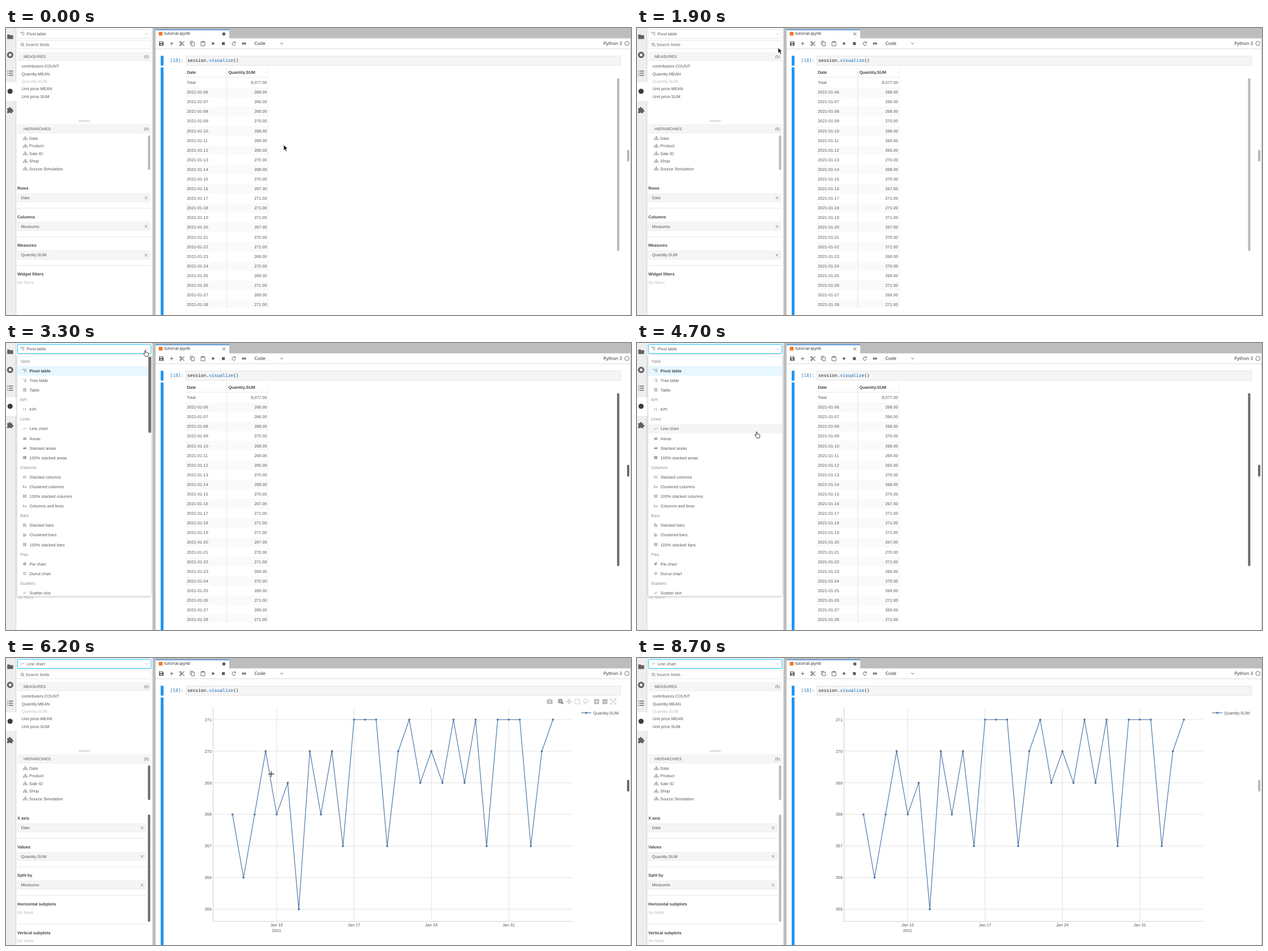
These frames come from a looping animation (1103 px wide and 508 px high, 8800 ms). An HTML page:

```html
<!DOCTYPE html>
<html lang="en">
<head>
<meta charset="utf-8">
<title>Notebook chart switch</title>
<style>
html, body { margin: 0; width: 100%; height: 100%; overflow: hidden; background: #fff; }
svg { display: block; width: 1103px; height: 508px; }
text { font: 7.32px "Liberation Sans", Arial, sans-serif; fill: #595959; text-rendering: geometricPrecision; white-space: pre; }
.b { font-weight: 700; fill: #434343; }
.off { fill: #bfbfbf; }
.head { fill: #8c8c8c; }
.cap { font-size: 7px; }
.num { font-size: 6.7px; }
.ui { font-family: "Open Sans", "Noto Sans", sans-serif; fill: #212121; }
.big { font-size: 7.93px; }
.code { font: 7.93px "DejaVu Sans Mono", monospace; fill: #212121; }
.tick { fill: #555; }
.bar { fill: #bababa; }
.dark .bar { fill: #6a6a6a; }
</style>
</head>
<body>
<svg id="stage" viewBox="0 0 1103 508"></svg>
<script>
const LOOP = 8800, ROW = 17.09, DAY = 19.5;
const values = [268, 266, 268, 270, 268, 269, 265, 270, 268, 270, 267, 271, 271, 271, 267,
  270, 271, 269, 270, 269, 271, 269, 271, 267, 271, 271, 271, 267, 270, 271];

// Drawing helpers; text is placed by its vertical middle
const text = (x, y, s, cls = '', more = '') => `<text x="${x}" y="${y + 2.6}" class="${cls}" ${more}>${s}</text>`;
const END = 'text-anchor="end"', MID = 'text-anchor="middle"';
const box = (x, y, w, h, fill, more = '') => `<rect x="${x}" y="${y}" width="${w}" height="${h}" fill="${fill}" ${more}/>`;
const frame = (x, y, w, h, fill, line, r = 1) => box(x, y, w, h, fill, `stroke="${line}" stroke-width=".7" rx="${r}"`);
const line = (d, color, w = 0.7, more = '') => `<path d="${d}" fill="none" stroke="${color}" stroke-width="${w}" ${more}/>`;
const shape = (d, fill, more = '') => `<path d="${d}" fill="${fill}" ${more}/>`;
const dot = (x, y, r, fill, more = '') => `<circle cx="${x}" cy="${y}" r="${r}" fill="${fill}" ${more}/>`;
const at = (x, y, s) => `<g transform="translate(${x} ${y})">${s}</g>`;
const group = (id, s, more = '') => `<g id="${id}" ${more}>${s}</g>`;
const each = (list, fn) => list.map(fn).join('');
const scroll = (x, y, h) => box(x, y, 4, h, '#bababa', 'class="bar" rx="2"');

// Small menu icons: grey part, blue part
const kinds = {
  pivot: ['M-1.2-3h4.5v1h-4.5zM-1.2-.8h4.5v1h-4.5zM-1.2 1.4h4.5v1h-4.5z', 'M-3.8-3h2v1.8h-2z'],
  tree: ['M-1.6-2.4h4.8v.9h-4.8zM-.5-.3h3.7v.9h-3.7zM-.5 1.7h3.7v.9h-3.7z', 'M-3.4-2.5h1.2v1h-1.2z'],
  table: ['M-3-.6h6v.9h-6zM-3 1.5h6v.9h-6zM-.4-.6h.8v3h-.8z', 'M-3-2.8h6v1.3h-6z'],
  kpi: ['M-2.8-1.2h2v1h-2zM.4-1.2h2v1h-2zM-2.8.8h1.6v.8h-1.6zM.4.8h2v.8h-2z', ''],
  line: ['M-3 1.4L-1-.6 .5.2 3-2v1L.6 1.1-.9.4-3 2.3z', ''],
  area: ['M-3 2.4V.6L-1-.4 1 .4 3-.4v2.8z', 'M-3 .2L-1-1.6 1-.6 3-2.4V-.8L1 0-1-.8-3 .3z'],
  area2: ['M-3 2.2V.3L-1-1.2 1-.5 3-2v4.2z', ''],
  area3: ['M-3 2.4V.4L-1-.5 1 .5 3-.5v2.9z', 'M-3-2.4h6V-.9L1 0-1-.9-3 0z'],
  col: ['M-3 .4h1.2v2H-3zM-.6-.2h1.2v2.6H-.6zM1.8.6H3v1.8H1.8z', 'M-3-1.2h1.2v1.4H-3zM-.6-2.2h1.2v1.8H-.6zM1.8-1H3V.4H1.8z'],
  col2: ['M-3-2h1.3v4.4H-3zM-.6 0h1.2v2.4H-.6zM1.8-1H3v3.4H1.8z', ''],
  col3: ['M-3 .2h1.4v2.4H-3zM-.7-.4h1.4v3H-.7zM1.6.4H3v2.2H1.6z', 'M-3-2.6h1.4V0H-3zM-.7-2.6h1.4v2H-.7zM1.6-2.6H3V.2H1.6z'],
  bar: ['M-.6-2.6h1.8v1.3H-.6zM.2-.6h2.4v1.3H.2zM-.2 1.4h3.4v1.3H-.2z', 'M-3-2.6h2.2v1.3H-3zM-3-.6H0v1.3h-3zM-3 1.4h2.6v1.3H-3z'],
  bar2: ['M-3-2.3h3.6v1.2H-3zM-3-.4h6v1.2h-6zM-3 1.5h5v1.2h-5z', ''],
  bar3: ['M-.8-2.6H3v1.3H-.8zM.2-.6H3v1.3H.2zM-.2 1.4H3v1.3H-.2z', 'M-3-2.6H-1v1.3h-2zM-3-.6H0v1.3h-3zM-3 1.4h2.6v1.3H-3z'],
  pie: ['M-.3-2.3A2.5 2.5 0 1 0 2.3.4H-.3z', 'M.2-2.8A2.6 2.6 0 0 1 2.8-.2H.2z'],
  donut: ['M0-2.5A2.5 2.5 0 1 0 2.5 0H1.4A1.4 1.4 0 1 1 0-1.4z', 'M.4-2.6A2.5 2.5 0 0 1 2.6-.4H1.5L.4-1.4z'],
  scatter: ['M-3 1.8L-1-.2 .4.9 3-2.2v1L.5 2-.9.9-2.6 2.5z', '']
};
const icon = (kind, x, y) => at(x, y, shape(kinds[kind][0], '#999') + shape(kinds[kind][1], '#7c9cbd'));

const items = [['Table'], ['Pivot table', 'pivot'], ['Tree table', 'tree'], ['Table', 'table'],
  ['KPI'], ['KPI', 'kpi'],
  ['Lines'], ['Line chart', 'line'], ['Areas', 'area'], ['Stacked areas', 'area2'], ['100% stacked areas', 'area3'],
  ['Columns'], ['Stacked columns', 'col'], ['Clustered columns', 'col2'], ['100% stacked columns', 'col3'], ['Columns and lines', 'col2'],
  ['Bars'], ['Stacked bars', 'bar'], ['Clustered bars', 'bar2'], ['100% stacked bars', 'bar3'],
  ['Pies'], ['Pie chart', 'pie'], ['Donut chart', 'donut'],
  ['Scatters'], ['Scatter plot', 'scatter']];
const rowTop = i => 23.7 + i * ROW;

function menu(id, sel) {
  const rows = each(items, ([name, kind], i) => {
    const y = rowTop(i) + ROW / 2;
    if (!kind) return text(25, y, name, 'head');
    const back = i === sel ? box(20, rowTop(i), 236, ROW, '#e6f7ff') : '';
    return back + icon(kind, 33, y - 0.4) + text(41.5, y, name, i === sel ? 'b' : '');
  });
  const hover = sel === 1 ? box(20, 0, 236, ROW, '#f5f5f5', 'id="hover"') : '';
  return group(id, box(20, 21.2, 236, 426.3, '#fff', 'rx="1.5" filter="url(#shadow)"') +
    `<g clip-path="url(#list)">${hover}${rows}</g>`);
}

function rail() {
  const c = '#616161';
  return box(0, 0, 18, 508, '#eee') + line('M17.6 0V508', '#c4c4c4') + box(0, 96, 18.2, 33, '#fff') +
    shape('M2.2 11.5h4l1.2 1.3h5.2v6.6H2.2z', c) +
    dot(7.3, 47.6, 5.6, c) + box(5.1, 45.4, 4.4, 4.4, '#eee') +
    each([76.3, 80, 83.7], y => box(2.2, y - 0.7, 1.5, 1.4, c) + box(4.9, y - 0.7, 7.4, 1.4, c)) +
    dot(7.2, 112, 4.6, '#3c3c3c') +
    at(7, 145, shape('M-5-3h2.9a1.7 1.7 0 1 1 3.2 0H4v3a1.7 1.7 0 1 1 0 3.2v2.6H1a1.7 1.7 0 0 0-3.2 0H-5V2.6a1.7 1.7 0 0 0 0-3z', c));
}

const section = (y, title, value, right, empty) => text(20, y, title, 'b') + (value
  ? frame(20, y + 9.9, right - 20, 14.6, '#f5f5f5', '#e8e8e8') + text(26.5, y + 17.1, value) +
    line(`M${right - 9.2} ${y + 14.7}l4.6 5m0-5l-4.6 5`, '#757575', 0.75)
  : text(20, y + 14.8, empty, 'off'));

const sections = (list, right, empty) => each(list, ([title, value], i) => {
  const y = 283.4 + i * 50.66;
  return section(y, title, value, right, empty) +
    (i < list.length - 1 ? line(`M20 ${y + 35.6}H${right + 2}`, '#dcdcdc') : '');
});

function fields() {
  const bar = (y, s) => box(20, y, 236, 15.6, '#f5f5f5') + line(`M20 ${y + 15.6}h236`, '#e6e6e6') +
    text(31, y + 8, s, 'cap') + text(252, y + 8, '(5)', 'num', END);
  const tree = line('M0-2.6V0M-3 2.4V0H3V2.4M0 0V2.4', '#777', 0.8) + box(-0.9, -3.3, 1.8, 1.4, '#777') +
    each([-3, 0, 3], x => box(x - 0.7, 1.8, 1.4, 1.4, '#777'));
  return frame(20.3, 22.2, 235.7, 14.6, '#fff', '#dedede') +
    dot(28.6, 29, 2.3, 'none', 'stroke="#555" stroke-width=".8"') + line('M30.3 30.8l2 2', '#555', 0.9) +
    text(34.5, 29.4, 'Search fields', '', 'style="fill:#6b6b6b"') + bar(42.4, 'MEASURES') +
    each(['contributors.COUNT', 'Quantity.MEAN', 'Quantity.SUM', 'Unit price.MEAN', 'Unit price.SUM'],
      (s, i) => text(27.5, 67.6 + i * 13.43, s, i === 2 ? 'off' : '')) +
    box(128, 163.4, 20, 2.4, '#d9d9d9') + bar(170.2, 'HIERARCHIES') +
    each(['Date', 'Product', 'Sale ID', 'Shop', 'Source Simulation'],
      (s, i) => at(34, 195.2 + i * 13.43, tree) + text(41, 195.2 + i * 13.43, s)) +
    scroll(250.5, 190, 61.5);
}

function notebook() {
  const c = '#616161';
  return box(258.5, 0, 5.5, 508, '#bdbdbd') + box(264, 0, 839, 18.6, '#bdbdbd') +
    box(264, 2.8, 130, 16, '#fff') + box(264, 2.6, 130, 1.2, '#1976d2') +
    box(269.6, 6.8, 6.6, 6.6, '#f37726') + text(279.5, 9.7, 'tutorial.ipynb', 'ui') +
    box(264, 18.6, 838, 18, '#fff') + line('M264 36.6H1102', '#d6d6d6') + line('M264 37.5H1102', '#f0f0f0') +
    line('M1102.3 18V508', '#bdbdbd', 1) +
    // toolbar
    shape('M270 23.6h6.3l1.8 1.8v6.2H270z', c) + box(271.3, 24.5, 4.6, 1.9, '#fff') + dot(274, 29.2, 1.2, '#fff') +
    line('M292.3 24.6v6M289.3 27.6h6', c, 1) +
    line('M308.6 25.8L314.6 31.4M308.6 29.4L314.6 23.8', c, 1.1) +
    dot(308, 25, 1.4, 'none', `stroke="${c}"`) + dot(308, 30.2, 1.4, 'none', `stroke="${c}"`) +
    line('M325.3 29.8v-6.4h5', c, 0.9) + line('M327.3 25.2h5v6.4h-5z', c, 0.9) +
    line('M344 24.4h7v7.2h-7z', c, 0.9) + box(345.7, 23.4, 3.6, 2.2, c) +
    shape('M363.7 24.5l5 3-5 3z', c) + box(381, 25, 5.2, 5.2, c) +
    line('M404.3 25.6A3 3 0 1 0 405 28.2', c, 1) + shape('M405.4 23.6v3h-3z', c) +
    shape('M416.8 24.8l3.8 2.7-3.8 2.7zM420.6 24.8l3.8 2.7-3.8 2.7z', c) +
    text(438.5, 27.5, 'Code', 'ui big', 'font-weight="500"') + line('M483.8 26.3l2.6 2.5 2.6-2.5', c, 1) +
    text(1054.3, 27.5, 'Python 3', 'ui big') + dot(1095.8, 27.4, 3.8, '#fff', `stroke="${c}" stroke-width=".9"`) +
    // cell
    box(273, 49.2, 5, 17.4, '#2196f3') + box(273, 69.8, 5, 439, '#2196f3') +
    text(289.5, 57.8, '[18]:', 'code', 'style="fill:#307fc1"') +
    frame(317.3, 49.4, 767.6, 16.8, '#f5f5f5', '#dedede', 0) +
    text(320, 57.8, 'session.<tspan fill="#0d67b5">visualize</tspan>()', 'code') + scroll(1096, 215.5, 21);
}

function pivot() {
  const rows = each(values.slice(0, 23), (v, i) => {
    const y = 113.6 + i * ROW;
    return (i % 2 ? '' : box(317, y - ROW / 2, 146, ROW, '#fafafa')) +
      text(319.3, y, `2021-01-${String(i + 6).padStart(2, '0')}`) + text(460.6, y, v + '.00', '', END);
  });
  return `<g clip-path="url(#grid)">${rows}</g>` + text(319.3, 78.2, 'Date', 'b') + text(392.4, 78.2, 'Quantity.SUM', 'b') +
    text(319.3, 96.5, 'Total') + text(460.6, 96.5, '8,077.00', '', END) +
    line('M317 87.2H463', '#e0e0e0') + line('M389.5 70V495', '#d9d9d9') + line('M463 70V495', '#ececec') +
    scroll(1078.4, 88.8, 306.2);
}

function chart() {
  const blue = '#4c78a8', px = i => 399.7 + i * DAY, py = v => 109 + (271 - v) * 55.95;
  const ticks = [['Jan 10', 4], ['Jan 17', 11], ['Jan 24', 18], ['Jan 31', 25]];
  return each([0, 1, 2, 3, 4, 5, 6], k => line(`M365.5 ${py(265 + k)}H999`, '#d4d4d4') +
      text(363, py(265 + k), 265 + k, 'tick', END)) +
    each(ticks, ([s, i]) => line(`M${px(i)} 88V466`, '#d4d4d4') + text(px(i), 472.6, s, 'tick', MID)) +
    text(px(4), 482, '2021', 'tick', MID) + line('M365.5 88V466.2H999', '#c2c2c2', 0.8) +
    line('M' + values.map((v, i) => `${px(i)} ${py(v)}`).join('L'), blue, 1.2, 'stroke-linejoin="round"') +
    each(values, (v, i) => dot(px(i), py(v), 1.85, blue)) +
    line('M1015 97H1033', blue, 1.2) + dot(1024, 97, 1.85, blue) + text(1036.3, 97, 'Quantity.SUM', 'tick');
}

function modebar() {
  const c = '#b8b8b8', z = '#6c6c6c';
  return shape('M954.6 74h2.6l.9-1.5h3l.9 1.5h2.6v7.2h-10z', c) + dot(959.6, 77.4, 2.1, '#fff') + dot(959.6, 77.4, 1.2, c) +
    dot(978.3, 76.4, 3.1, 'none', `stroke="${z}" stroke-width="1.4"`) + line('M980.8 78.8l2.6 2.6', z, 1.7) +
    line('M976.8 76.4h3M978.3 74.9v3', z, 0.8) +
    line('M989.4 77h8.4M993.6 72.8v8.4', c, 1) +
    shape('M988.6 77l2-1.8v3.6zM998.6 77l-2-1.8v3.6zM993.6 72l-1.8 2h3.6zM993.6 82l-1.8-2h3.6z', c) +
    line('M1004.3 72.9h8.4v8.4h-8.4z', c, 1.1, 'stroke-dasharray="1.7 1.2"') +
    line('M1020.4 81.8c2-1 .6-2.4-.6-3.4-2.2-2.4.2-5.2 3.4-5.2 3.4 0 5.2 2.6 3.4 4.6-1.4 1.6-4 1.6-6 .8', c, 1) +
    box(1037.9, 72.7, 8.8, 8.8, c) + line('M1040 77.1h4.6M1042.3 74.8v4.6', '#fff', 1.1) +
    box(1052.6, 72.7, 8.8, 8.8, c) + line('M1054.7 77.1h4.6', '#fff', 1.1) +
    line('M1067.4 75v-2.4h2.4M1073.6 72.6h2.6V75M1076.2 79v2.4h-2.6M1069.8 81.4h-2.4V79M1069.2 74.4l5.2 5.2M1074.4 74.4l-5.2 5.2', c, 1);
}

const cursors = {
  arrow: shape('M0 0V9.6L2.3 7.5 4 11.4 5.7 10.6 4 6.9 7 6.6z', '#111', 'stroke="#fff" stroke-width=".6"'),
  hand: shape('M-1 .8C-1-.4.7-.4.8.8V4C1.2 3.2 2.4 3.4 2.5 4.2 3 3.6 4 3.8 4.1 4.6 4.8 4.2 5.5 4.7 5.5 5.5V7.4C5.5 9 4.7 9.6 4.6 10.8H-.1C-.6 9-3.4 6.6-3.4 5.6-3.2 4.6-1.9 4.9-1 6z', '#fff',
    'stroke="#222" stroke-width=".9" stroke-linejoin="round"'),
  cross: line('M-5.5 0H5.5M0-5.5V5.5', '#fff', 2.2) + line('M-5.2 0H5.2M0-5.2V5.2', '#222', 1.2)
};

const stage = document.getElementById('stage');
stage.innerHTML = `<defs>
  <clipPath id="list"><rect x="20" y="23" width="236" height="422.6"/></clipPath>
  <clipPath id="grid"><rect x="317" y="70" width="147" height="425"/></clipPath>
  <filter id="shadow" x="-10%" y="-5%" width="120%" height="110%"><feDropShadow dx="0" dy="1.2" stdDeviation="2" flood-opacity=".28"/></filter>
</defs>` +
  box(0, 0, 1103, 508, '#fff') + rail() + fields() +
  group('rows', sections([['Rows', 'Date'], ['Columns', 'Measures'], ['Measures', 'Quantity.SUM'], ['Widget filters']], 254, 'No filters')) +
  group('axes', sections([['X axis', 'Date'], ['Values', 'Quantity.SUM'], ['Split by', 'Measures'],
    ['Horizontal subplots'], ['Vertical subplots']], 247, 'No fields') + scroll(250.5, 277, 190)) +
  notebook() + group('pivot', pivot()) + group('chart', chart()) + group('modebar', modebar()) +
  group('saved', line('M382 8l5 5m0-5l-5 5', '#555', 1)) + group('unsaved', dot(384.5, 10.6, 2.8, '#616161')) +
  box(19.6, 1.8, 237, 17.4, 'none', 'id="glow" rx="1.8" stroke="#c5effb" stroke-width="1.2"') +
  box(20.3, 2.5, 235.6, 16, '#fff', 'id="select" rx="1.2"') +
  group('pickPivot', icon('pivot', 29, 10) + text(36.3, 10.3, 'Pivot table')) +
  group('pickLine', icon('line', 29, 10) + text(36.3, 10.3, 'Line chart')) +
  line('M245.4 9l2.9 3 2.9-3', '#bdbdbd', 0.8) +
  menu('menu', 1) + group('menuBar', box(251.2, 24, 5, 135, '#707070', 'rx="2.5"')) + menu('closing', 7) +
  group('cursor', Object.keys(cursors).map(k => group(k, cursors[k])).join(''));

const el = Object.fromEntries([...stage.querySelectorAll('[id]')].map(n => [n.id, n]));
el.closing.setAttribute('transform', 'translate(0 .25) scale(1 .9895)');
el.closing.setAttribute('opacity', '.95');
const show = (id, on) => { el[id].style.display = on ? '' : 'none'; };

// Free pointer travel, then held stops: time, x, y, cursor, hovered row
const travel = [[700, 490, 207], [1600, 271, 64], [1900, 249, 35], [2500, 246, 13]];
const stops = [[2500, 246, 13, 'hand', 1], [3600, 243.5, 20, 'hand', 1], [3700, 241.5, 27, 'hand', 1], [3900, 233.5, 48, 'hand', 1],
  [4100, 220.5, 93, 'hand', 3], [4300, 217.5, 129, 'hand', 5], [4500, 210.5, 158, 'hand', 7], [4700, 211.3, 157.3, 'hand', 7],
  [5200, 210, 158], [5500, 294, 182], [5800, 432, 191, 'cross'], [6000, 467.5, 204.6, 'cross'], [6200, 468, 205.4, 'cross'],
  [7800, 406, 166, 'cross'], [8100, 141.5, 18.3, 'hand'], [8300, 0, 0, 'none']];

function pointer(t) {
  if (t >= 2500) return stops.filter(s => s[0] <= t).pop();
  const q = Math.max(700, Math.floor(t / 100) * 100);
  const k = travel.findIndex((p, i) => q < travel[i + 1][0]);
  const [a, b] = [travel[k], travel[k + 1]];
  let p = (q - a[0]) / (b[0] - a[0]);
  if (k === 0) p = 1 - (1 - p) ** 1.5;
  const x = a[1] + (b[1] - a[1]) * p, y = a[2] + (b[2] - a[2]) * p;
  return [q, x, y, y < 18.6 ? 'hand' : 'arrow'];
}

function render(t) {
  const isLine = t >= 5200, open = t >= 3300 && t < 5200;
  const [, x, y, kind = 'arrow', row = 1] = pointer(t);
  const saved = t >= 1200 && t < 5200;
  const lit = t >= 3300 || (t > 1900 && kind === 'hand');
  show('rows', !isLine); show('pivot', !isLine); show('pickPivot', !isLine);
  show('axes', isLine); show('chart', isLine); show('pickLine', isLine);
  show('menu', open); show('menuBar', open && t < 4700); show('closing', isLine && t < 5500);
  show('saved', saved); show('unsaved', !saved);
  show('glow', t >= 3300);
  el.select.setAttribute('stroke', lit ? '#35c3ef' : '#dcdcdc');
  el.select.setAttribute('stroke-width', lit ? 1 : 0.7);
  el.hover.setAttribute('y', rowTop(row));
  const fade = t < 5800 ? 0 : t < 6000 ? 0.6 : t < 8100 ? 1 : t < 8300 ? 0.4 : 0;
  el.modebar.setAttribute('opacity', fade);
  stage.classList.toggle('dark', t >= 3300 && t < 8700);
  for (const k in cursors) show(k, k === kind);
  el.cursor.setAttribute('transform', `translate(${x} ${y})`);
}

const start = performance.now();
function tick() {
  render((performance.now() - start) % LOOP);
  requestAnimationFrame(tick);
}
tick();
</script>
</body>
</html>
```
